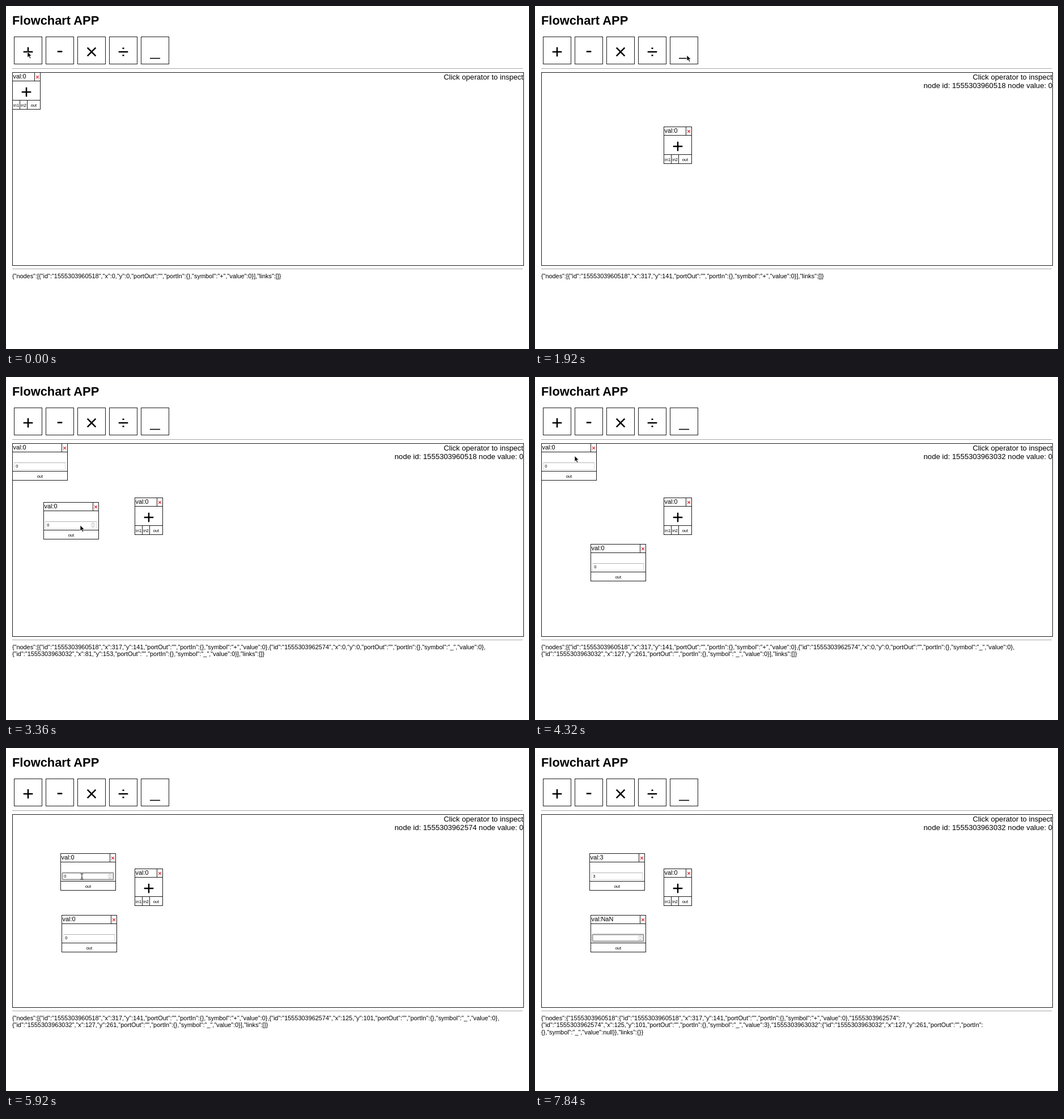
These frames come from a looping animation (923x606 px, 8 s). An HTML page:

```html
<!DOCTYPE html>
<html lang="en">
<head>
<meta charset="utf-8">
<title>Flowchart APP</title>
<style>
  html, body { margin: 0; width: 100%; height: 100%; overflow: hidden; background: #fff; }
  svg { display: block; width: 923px; height: 606px; font-family: "Liberation Sans", Arial, sans-serif; }
  text { white-space: pre; fill: #000; }
  h1, .title { font-size: 21.84px; font-weight: bold; }
  .info { font-size: 13.1px; text-anchor: end; }
  .body { font-size: 10.92px; }
  .port { font-size: 7.5px; }
  .mid { text-anchor: middle; }
  .box { fill: #fff; stroke: #1c1c1c; shape-rendering: crispEdges; }
  .line { fill: none; stroke: #1c1c1c; shape-rendering: crispEdges; }
  .rule { stroke: #a8a8a8; shape-rendering: crispEdges; }
  .sym { fill: none; stroke: #000; stroke-width: 2.5; }
  .close { fill: none; stroke: #d8202a; stroke-width: 1.2; }
  .field { fill: #fff; stroke: #dcdcdc; shape-rendering: crispEdges; }
  .edge { stroke: #b4b4b4; shape-rendering: crispEdges; }
  .ring { fill: none; stroke: #a6a6a6; stroke-width: 2.4; }
  .spin { fill: none; stroke: #888; stroke-width: .8; }
  .caret { stroke: #000; }
</style>
</head>
<body>
<svg id="stage" viewBox="0 0 923 606">
  <text class="title" x="11" y="33">Flowchart APP</text>
  <g id="tools"></g>
  <path class="rule" d="M11 110.5H912M11 464.5H912"/>
  <rect class="box" x="11.5" y="117.5" width="902" height="341"/>
  <g id="nodes"></g>
  <text class="info" x="913" y="129.8">Click operator to inspect</text>
  <text class="info" id="info" x="913" y="144.8"></text>
  <g id="json"></g>
  <path id="arrow" d="M0 0V10L2.3 7.8 4.1 11.8 5.8 11 4.1 7.1H7.2Z" stroke="#fff" stroke-width=".7"/>
  <path id="beam" d="M-2.5-5Q0-5 0-3.5Q0-5 2.5-5M0-4V4M-2.5 5Q0 5 0 3.5Q0 5 2.5 5M-1 1.5H1" fill="none" stroke="#222"/>
</svg>
<script>
const LOOP = 8000, STEP = 160, SCALE = 0.6825;
const $ = id => document.getElementById(id);

function add(parent, tag, attrs, text) {
  const el = document.createElementNS('http://www.w3.org/2000/svg', tag);
  for (const k in attrs) el.setAttribute(k, attrs[k]);
  if (text !== undefined) el.textContent = text;
  return parent.appendChild(el);
}
const path = (parent, cls, d) => add(parent, 'path', { class: cls, d });
const label = (parent, cls, x, y, text) => add(parent, 'text', { class: cls, x, y }, text);
const show = (el, on) => el.setAttribute('visibility', on ? 'visible' : 'hidden');
const move = (el, x, y) => el.setAttribute('transform', `translate(${x} ${y})`);

// Linear interpolation through [time, x, y] keys
function at(keys, t) {
  const i = keys.findIndex(k => k[0] > t);
  if (i === 0) return keys[0].slice(1);
  if (i < 0) return keys[keys.length - 1].slice(1);
  const [t0, x0, y0] = keys[i - 1], [t1, x1, y1] = keys[i];
  const p = (t - t0) / (t1 - t0);
  return [x0 + (x1 - x0) * p, y0 + (y1 - y0) * p];
}
// Last value whose time has come
const latest = (keys, t) => keys.reduce((v, k) => k[0] <= t ? k[1] : v, undefined);

const PLUS = 'M-8.3 0H8.3M0-8.3V8.3';
[PLUS, 'M-4.3-.5H4.3', 'M-7.3-7.3L7.3 7.3M7.3-7.3L-7.3 7.3',
 'M-8.3 0H8.3M-1.5-6.3H1.5M-1.5 6.3H1.5', 'M-9.1 11.5H9.1'].forEach((d, i) => {
  const x = 14.5 + 56 * i;
  add($('tools'), 'rect', { class: 'box', x, y: 54.5, width: 49, height: 48 });
  const sym = path($('tools'), 'sym', d);
  move(sym, x + 24.5, 81);
  if (i === 4) sym.style.strokeWidth = 1.6;
});

const nodes = [
  { id: '1555303960518', symbol: '+', born: 0, values: [[0, 0]],
    keys: [[480, 0, 0], [960, 253, 103], [1280, 317, 141]] },
  { id: '1555303962574', symbol: '_', born: 2080, values: [[0, 0], [6240, null], [6560, 3]],
    keys: [[4320, 0, 0], [4960, 125, 101]], focus: [5280, 7200] },
  { id: '1555303963032', symbol: '_', born: 2560, values: [[0, 0], [7360, null]],
    keys: [[3040, 0, 0], [3360, 81, 153], [3680, 127, 261]], focus: [7200, LOOP] }
];
const MAP_FROM = 6240;  // the store is written as a map after the first edit
const clicks = [[1280, nodes[0].id], [3840, nodes[2].id], [5120, nodes[1].id], [7200, nodes[2].id]];

const pointer = [
  [0, 38, 81], [160, 38, 83], [480, 46, 156], [960, 218, 226], [1280, 262, 252],
  [1440, 262, 252], [1920, 268, 87], [2720, 268, 87], [3040, 75.6, 157.5],
  [3360, 131, 262], [3680, 162.2, 335.6], [3840, 162.2, 335.6], [4320, 70, 139.5],
  [4960, 155.3, 208.4], [5120, 155.3, 208.4], [5280, 134, 227], [6720, 134, 227],
  [7200, 140, 335]
];
const typing = [[6240, 6720], [7360, LOOP]];

for (const n of nodes) {
  const g = n.el = add($('nodes'), 'g', {});
  const op = n.symbol === '+', w = op ? 49 : 97, sep = w - 10;
  add(g, 'rect', { class: 'box', x: 0, y: 0, width: w, height: 65 });
  path(g, 'line', `M0 15H${w}M${sep} 0V15M0 49H${w}` + (op ? 'M13 49V65M26 49V65' : ''));
  n.val = label(g, 'body', 1, 10.4, '');
  move(path(g, 'close', 'M-2.4-2.4L2.4 2.4M2.4-2.4L-2.4 2.4'), w - 5, 8);
  if (op) {
    move(path(g, 'sym', PLUS), 24.5, 34.5);
    label(g, 'port mid', 6.6, 60.2, 'in1');
    label(g, 'port mid', 19.5, 60.2, 'in2');
  } else {
    add(g, 'rect', { class: 'field', x: 3, y: 34, width: 90, height: 12 });
    path(g, 'edge', 'M3 34H93');
    n.ring = add(g, 'rect', { class: 'ring', x: 3, y: 34, width: 90, height: 12, rx: 1 });
    n.text = label(g, 'port', 5.8, 42.7, '');
    n.caret = path(g, 'caret', '');
    n.spin = add(g, 'g', {});
    add(n.spin, 'rect', { class: 'spin', x: 84, y: 36, width: 6, height: 8, rx: 2, style: 'stroke:#ccc' });
    path(n.spin, 'spin', 'M85.5 39L87 37.3 88.5 39M85.5 41.2L87 42.9 88.5 41.2');
  }
  label(g, 'port mid', op ? 37.4 : 48.4, 60.2, 'out');
}
const rows = [481, 493.3, 505.6].map(y => label($('json'), 'body', 10.9, y, ''));

const entry = n => JSON.stringify({
  id: n.id, x: Math.round(n.x), y: Math.round(n.y),
  portOut: '', portIn: {}, symbol: n.symbol, value: n.value
});

function store(list, t) {
  if (t < MAP_FROM) {
    const [a, b, c] = list.map(entry);
    return `{"nodes":[${a}${b ? ',' + b : ''}${c ? ',\n' + c : ''}],"links":[]}`;
  }
  const [a, b, c] = list.map(n => `"${n.id}":${entry(n)}`);
  return `{"nodes":{${a},${b.replace(':{', ':\n{')},${c.replace('"portIn":', '$&\n')}},"links":{}}`;
}

function draw(t) {
  const [px, py] = at(pointer, t);
  let beam = false;
  for (const n of nodes) {
    [n.x, n.y] = at(n.keys, t);
    n.value = latest(n.values, t);
    const x = Math.round(11 + n.x * SCALE) + .5, y = Math.round(117 + n.y * SCALE) + .5;
    const alive = t >= n.born;
    n.el.style.display = alive ? '' : 'none';
    move(n.el, x, y);
    n.val.textContent = 'val:' + (n.value === null ? 'NaN' : n.value);
    if (!n.text) continue;

    const hover = alive && px > x + 3 && px < x + 93 && py > y + 33 && py < y + 47;
    const focused = t >= n.focus[0] && t < n.focus[1];
    const dragging = t >= n.keys[0][0] && t <= n.keys[n.keys.length - 1][0];
    beam = beam || hover && !dragging;
    n.text.textContent = n.value === null ? '' : n.value;
    show(n.ring, focused);
    show(n.spin, hover);
    show(n.caret, focused && (t - n.focus[0]) % 1000 < 500);
    n.caret.setAttribute('d', `M${n.value === null ? 6 : 10.5} 36V44`);
  }

  const id = latest(clicks, t);
  $('info').textContent = id ? `node id: ${id} node value: 0` : '';
  const lines = store(nodes.filter(n => t >= n.born), t).split('\n');
  rows.forEach((row, i) => row.textContent = lines[i] || '');

  const hidden = typing.some(([a, b]) => t >= a && t <= b);
  show($('arrow'), !hidden && !beam);
  show($('beam'), !hidden && beam);
  move($('arrow'), px, py);
  move($('beam'), px, py);
}

const start = performance.now();
function tick() {
  const t = (performance.now() - start) % LOOP;
  draw(Math.floor(t / STEP) * STEP);
  requestAnimationFrame(tick);
}
tick();
</script>
</body>
</html>
```
